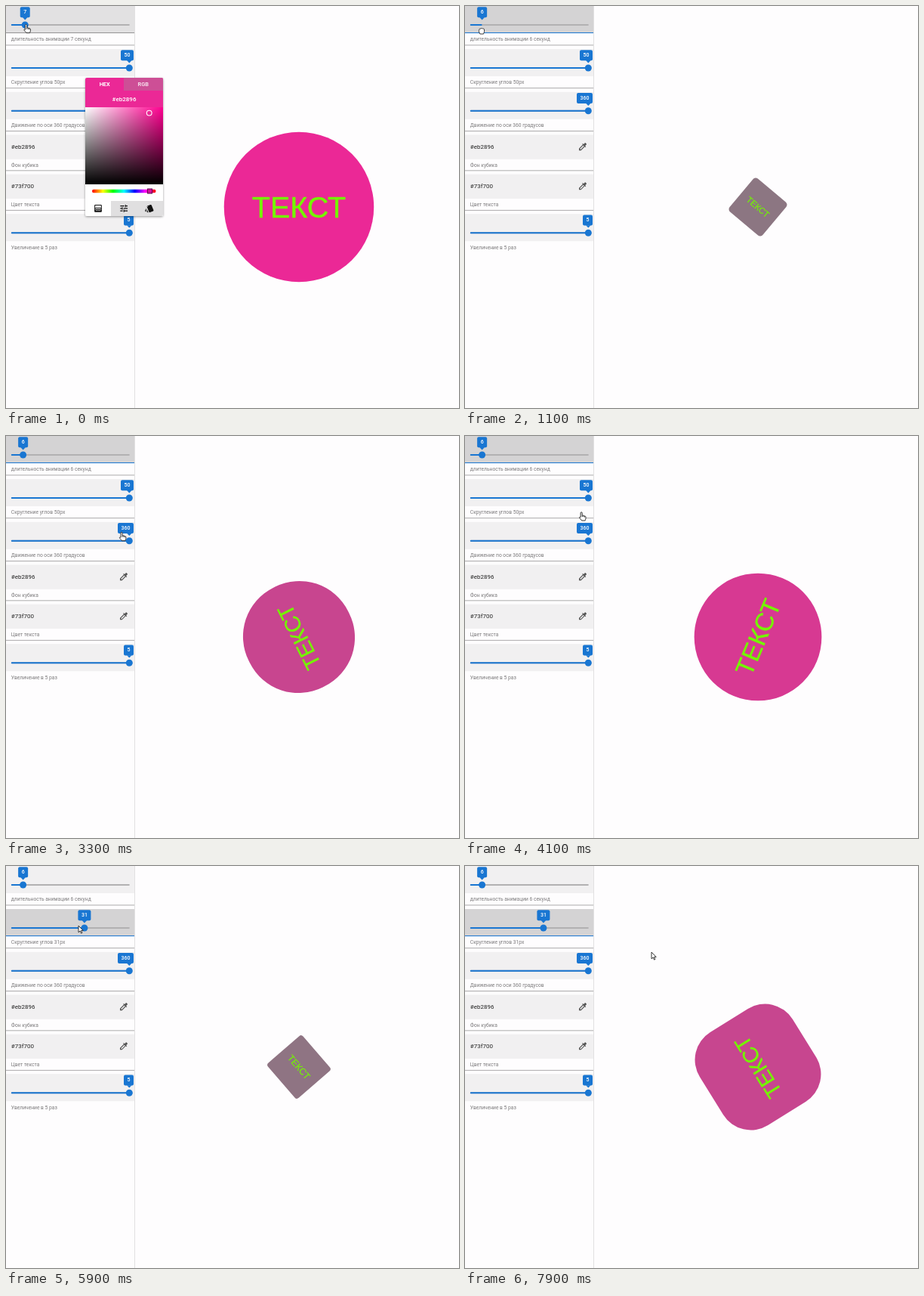
These frames come from a looping animation (600x532 px, 8000 ms). An HTML page:

```html
<!DOCTYPE html>
<html lang="ru">
<head>
<meta charset="utf-8">
<title>Настройки кубика</title>
<style>
  html, body { margin: 0; width: 100%; height: 100%; overflow: hidden; background: #fefdfe; }
  svg { display: block; width: 600px; height: 532px; font-family: Roboto, sans-serif; }
  .under { fill: none; }
  .hint { font-size: 6.7px; fill: #7c7b7c; }
  .value { font-size: 8px; fill: #222; }
  .tip { font-size: 7px; font-weight: 500; fill: #fff; text-anchor: middle; }
  .blue { fill: #1976d2; }
  .icon { fill: #555; }
  .cube { font-family: "Liberation Sans", Arial, sans-serif; font-size: 7.9px; fill: #73f700; stroke: #73f700; stroke-width: .1; text-anchor: middle; }
  .head { font-size: 7.4px; font-weight: 700; fill: #fff; text-anchor: middle; }
  .cursor path { fill: #fff; stroke: #222; stroke-width: .9; stroke-linejoin: round; }
</style>
</head>
<body>
<svg id="stage" viewBox="0 0 600 532">
  <defs>
    <linearGradient id="sat"><stop stop-color="#fff"/><stop offset="1" stop-color="#fff" stop-opacity="0"/></linearGradient>
    <linearGradient id="dark" x2="0" y2="1"><stop stop-opacity="0"/><stop offset="1"/></linearGradient>
    <linearGradient id="hue">
      <stop stop-color="#f00"/><stop offset=".17" stop-color="#ff0"/><stop offset=".33" stop-color="#0f0"/>
      <stop offset=".5" stop-color="#0ff"/><stop offset=".67" stop-color="#00f"/>
      <stop offset=".83" stop-color="#f0f"/><stop offset="1" stop-color="#f00"/>
    </linearGradient>
    <filter id="shadow" x="-10%" y="-10%" width="120%" height="120%">
      <feDropShadow dx="0" dy="1" stdDeviation="1.6" flood-opacity=".4"/>
    </filter>
    <path id="dropper" d="M20.71 5.63l-2.34-2.34c-.39-.39-1.02-.39-1.41 0l-3.12 3.12-1.93-1.91-1.41 1.41 1.42 1.42L3 16.25V21h4.75l8.92-8.92 1.42 1.42 1.41-1.41-1.92-1.92 3.12-3.12c.4-.4.4-1.03.01-1.42zM6.92 19L5 17.08l8.06-8.06 1.92 1.92L6.92 19z"/>
  </defs>

  <rect x="170" width="1" height="532" fill="#e1e0e1"/>
  <g id="fields"></g>

  <g id="cube">
    <rect id="box" x="-19.85" y="-19.85" width="39.7" height="39.7"/>
    <text class="cube" y="2.8">ТЕКСТ</text>
  </g>

  <g id="picker">
    <rect x="105" y="95" width="103" height="183" rx="2" fill="#fff" filter="url(#shadow)"/>
    <path d="M105 134V97q0-2 2-2h99q2 0 2 2v37z" fill="#eb2896"/>
    <path d="M156 112V95h50q2 0 2 2v15z" fill="#cd4f96"/>
    <text class="head" x="130.7" y="106.3">HEX</text>
    <text class="head" x="181.7" y="106.3" opacity=".8">RGB</text>
    <text class="head" x="156.5" y="126.3" style="font-size:8px;font-weight:500">#eb2896</text>
    <g id="shade">
      <rect x="105" y="134" width="103" height="102" fill="#ff0090"/>
      <rect x="105" y="134" width="103" height="102" fill="url(#sat)"/>
      <rect x="105" y="134" width="103" height="102" fill="url(#dark)"/>
    </g>
    <circle cx="189.7" cy="141.6" r="3.4" fill="none" stroke="#fff" stroke-width="1.1"/>
    <rect x="114" y="242.7" width="84.5" height="4.6" rx="2.2" fill="url(#hue)"/>
    <rect x="187.5" y="242" width="6" height="6" fill="#d0109c" stroke="#5b1050"/>
    <path d="M139 258h69v18q0 2-2 2h-67z" fill="#e0dfe0"/>
    <g fill="#111">
      <path transform="translate(115.5 261.4) scale(.54)" d="M11 9h2v2h-2zm-2 2h2v2H9zm4 0h2v2h-2zm2-2h2v2h-2zM7 9h2v2H7zm12-6H5c-1.1 0-2 .9-2 2v14c0 1.1.9 2 2 2h14c1.1 0 2-.9 2-2V5c0-1.1-.9-2-2-2zM9 18H7v-2h2v2zm4 0h-2v-2h2v2zm4 0h-2v-2h2v2zm2-7h-2v2h2v2h-2v-2h-2v2h-2v-2h-2v2H9v-2H7v2H5v-2h2v-2H5V5h14v6z"/>
      <path transform="translate(149.7 261.4) scale(.54)" d="M3 17v2h6v-2H3zM3 5v2h10V5H3zm10 16v-2h8v-2h-8v-2h-2v6h2zM7 9v2H3v2h4v2h2V9H7zm14 4v-2H11v2h10zm-6-4h2V7h4V5h-4V3h-2v6z"/>
      <path transform="translate(183.5 261.4) scale(.54)" d="M2.53 19.65l1.34.56v-9.03l-2.43 5.86c-.41 1.02.08 2.19 1.09 2.61zm19.5-3.7L17.07 3.98c-.31-.75-1.04-1.21-1.81-1.23-.26 0-.53.04-.79.15L7.1 5.95c-.75.31-1.21 1.03-1.23 1.8-.01.27.04.54.15.8l4.96 11.97c.31.76 1.05 1.22 1.83 1.23.26 0 .52-.05.77-.15l7.36-3.05c1.02-.42 1.51-1.59 1.09-2.6zM7.88 8.75c-.55 0-1-.45-1-1s.45-1 1-1 1 .45 1 1-.45 1-1 1zm-2 11c0 1.1.9 2 2 2h1.45l-3.45-8.34v6.34z"/>
    </g>
  </g>

  <g id="cursor" class="cursor">
    <path id="arrow" d="M0 0V8.8L2.1 6.9L3.5 10.1L4.9 9.5L3.5 6.4H6.2z"/>
    <path id="hand" d="M0 .4c.8 0 1.1.5 1.1 1.1v3.2c1-.4 1.6 0 1.7.5.9-.3 1.5 0 1.6.6 1-.2 1.5.3 1.5 1v2c0 1.3-.9 1.8-.9 2.8H.4c-.3-1.3-2.5-2.5-3-3.9-.2-.8.9-1.1 1.6-.4V1.5C-1 .8-.6.4 0 .4zM1.1 4.7v2M2.8 5.2v1.6M4.4 5.8v1.4"/>
    <path id="grab" d="M-3.2.4c0-1 .7-1.4 1.4-1 .2-1 1.3-1 1.7-.4.5-.6 1.5-.5 1.8.2.8-.4 1.8 0 1.8 1v2.5c0 1.7-.9 1.9-.9 3.3h-4.8C-2.4 4.5-3.6 4-3.6 2.4c0-.8.1-1 .4-1z"/>
  </g>
</svg>

<script>
const LOOP = 8000, STEP = 100;
const $ = id => document.getElementById(id);
const show = (node, on) => node.setAttribute('display', on ? 'inline' : 'none');
const set = (node, attrs) => { for (const k in attrs) node.setAttribute(k, attrs[k]); };

// Piecewise linear value from [time, value] points
function track(points, t) {
  if (t <= points[0][0]) return points[0][1];
  for (let i = 1; i < points.length; i++) {
    const [a, u] = points[i - 1], [b, v] = points[i];
    if (t <= b) return u + (v - u) * (t - a) / (b - a);
  }
  return points[points.length - 1][1];
}

// CSS "ease", solved by bisection
function ease(x) {
  let lo = 0, hi = 1, s;
  for (let i = 0; i < 24; i++) {
    s = (lo + hi) / 2;
    if (.75 * s * (1 - s) + s ** 3 < x) lo = s; else hi = s;
  }
  return .3 * s * (1 - s) ** 2 + 3 * s * s * (1 - s) + s ** 3;
}

function addField(y, height, hint, line) {
  const g = document.createElementNS('http://www.w3.org/2000/svg', 'g');
  g.innerHTML = `
    <rect class="back" y="${y}" width="170" height="${height}" fill="#f1f0f1"/>
    <rect class="under" y="${y + height - 1}" width="170" height="1"/>
    <text class="hint" x="6.8" y="${y + height + 10.3}">${hint}</text>
    ${line ? `<rect y="${line}" width="170" height=".9" fill="#a3a2a3"/>` : ''}`;
  $('fields').append(g);
  const back = g.querySelector('.back'), under = g.querySelector('.under');
  return {
    g,
    hint: s => { g.querySelector('.hint').textContent = s; },
    state(focus, hover) {
      back.setAttribute('fill', focus ? '#d4d3d4' : hover ? '#e2e1e2' : '#f1f0f1');
      under.style.fill = focus ? '#1976d2' : hover ? '#959495' : 'none';
    }
  };
}

function addSlider(y, max, value, hint, line) {
  const field = addField(y, 36, hint(value), line);
  field.g.insertAdjacentHTML('beforeend', `
    <rect x="6.8" y="${y + 24}" width="157" height="2.1" rx="1" fill="#b2b1b2"/>
    <rect class="blue fill" x="6.8" y="${y + 24}" height="2.1" rx="1"/>
    <circle class="blue halo" cy="${y + 25}" r="7.2" opacity=".3"/>
    <circle class="blue thumb" cy="${y + 25}" r="4.5"/>
    <path class="blue nib"/>
    <rect class="blue tag" y="${y + 1.3}" height="14" rx="2"/>
    <text class="tip" y="${y + 10.2}"></text>`);
  const [fill, halo, thumb, nib, tag, tip] =
    ['.fill', '.halo', '.thumb', '.nib', '.tag', '.tip'].map(s => field.g.querySelector(s));
  field.move = (v, drag = false, glow = false) => {
    const label = String(Math.round(v));
    const x = 7 + 156.3 * v / max, w = 9 + 4 * label.length;
    const mid = Math.min(x, 169 - w / 2);
    set(fill, { width: x - 6.8 });
    set(halo, { cx: x });
    set(thumb, { cx: x });
    set(nib, { d: `M${x - 3.2} ${y + 15}h6.4l-3.2 3.4z` });
    set(tag, { x: mid - w / 2, width: w });
    set(tip, { x: mid });
    tip.textContent = label;
    show(thumb, !drag);
    show(halo, glow);
    field.hint(hint(Math.round(v)));
  };
  field.move(value);
  return field;
}

function addColor(y, value, hint, line) {
  const { g } = addField(y, 32.4, hint, line);
  g.insertAdjacentHTML('beforeend', `
    <text class="value" x="6.8" y="${y + 18.3}">${value}</text>
    <use class="icon" href="#dropper" transform="translate(149.3 ${y + 9}) scale(.56)"/>`);
}

const duration = addSlider(0, 60, 7, v => `длительность анимации ${v} секунд`, 51.4);
const corner = addSlider(57, 50, 50, v => `Скругление углов ${v}px`, 108.2);
const turn = addSlider(113.7, 360, 360, v => `Движение по оси ${v} градусов`, 165);
addColor(170.4, '#eb2896', 'Фон кубика', 217.4);
addColor(222.6, '#73f700', 'Цвет текста', 269.9);
addSlider(275.2, 5, 5, v => `Увеличение в ${v} раз`);

// Phase of the cube's run: finished, restarted, restarted again
const RUN_A = 800, RUN_B = 5000;
const phaseA = [[800, .07], [1100, .11], [2100, .243], [3300, .3955], [4900, .625]];
const phaseB = [[4960, 0], [6900, .2575], [7900, .3855]];

const cursorX = [[0, 26.5], [700, 22], [1200, 22], [2000, 171], [2200, 171], [3200, 153], [3600, 153],
                 [4500, 155], [5000, 155], [5800, 96], [5900, 96], [6700, 247]];
const cursorY = [[0, 24], [300, 27], [700, 31], [1200, 31], [2000, 150], [2200, 150], [3200, 127], [3600, 127],
                 [4500, 79], [5900, 79], [6700, 114]];
const between = (t, a, b) => t >= a && t < b;

function drawCube(t, radius) {
  const p = t < RUN_A ? 1 : ease(track(t < RUN_B ? phaseA : phaseB, t));
  const rgb = [235, 40, 150].map(c => Math.round(128 + (c - 128) * p));
  set($('cube'), { transform: `translate(388 266) rotate(${360 * p}) scale(${1 + 4 * p})` });
  set($('box'), { rx: Math.min(19.85, .575 * radius * p), fill: `rgb(${rgb})` });
}

function draw(t) {
  const dragA = between(t, 200, 1300), dragB = between(t, 5000, 5900);
  const radius = track([[5000, 50], [5800, 31]], t);

  duration.move(t < 300 ? 7 : 6, dragA);
  duration.state(between(t, 700, 5000), t < 700);
  corner.move(radius, dragB, between(t, 4600, 5000));
  corner.state(t >= 5000, between(t, 4400, 5000));
  turn.state(false, between(t, 1900, 2300));

  set($('picker'), { opacity: track([[100, 1], [400, 0]], t) });
  drawCube(t, radius);

  const drag = dragA || dragB;
  const hand = !drag && (t < 200 || between(t, 2800, 5000));
  show($('grab'), drag);
  show($('hand'), hand);
  show($('arrow'), !drag && !hand);
  set($('cursor'), { transform: `translate(${track(cursorX, t)} ${track(cursorY, t)})` });
}

const start = performance.now();
function tick() {
  const t = (performance.now() - start) % LOOP;
  draw(Math.floor(t / STEP) * STEP);
  requestAnimationFrame(tick);
}
tick();
</script>
</body>
</html>
```
